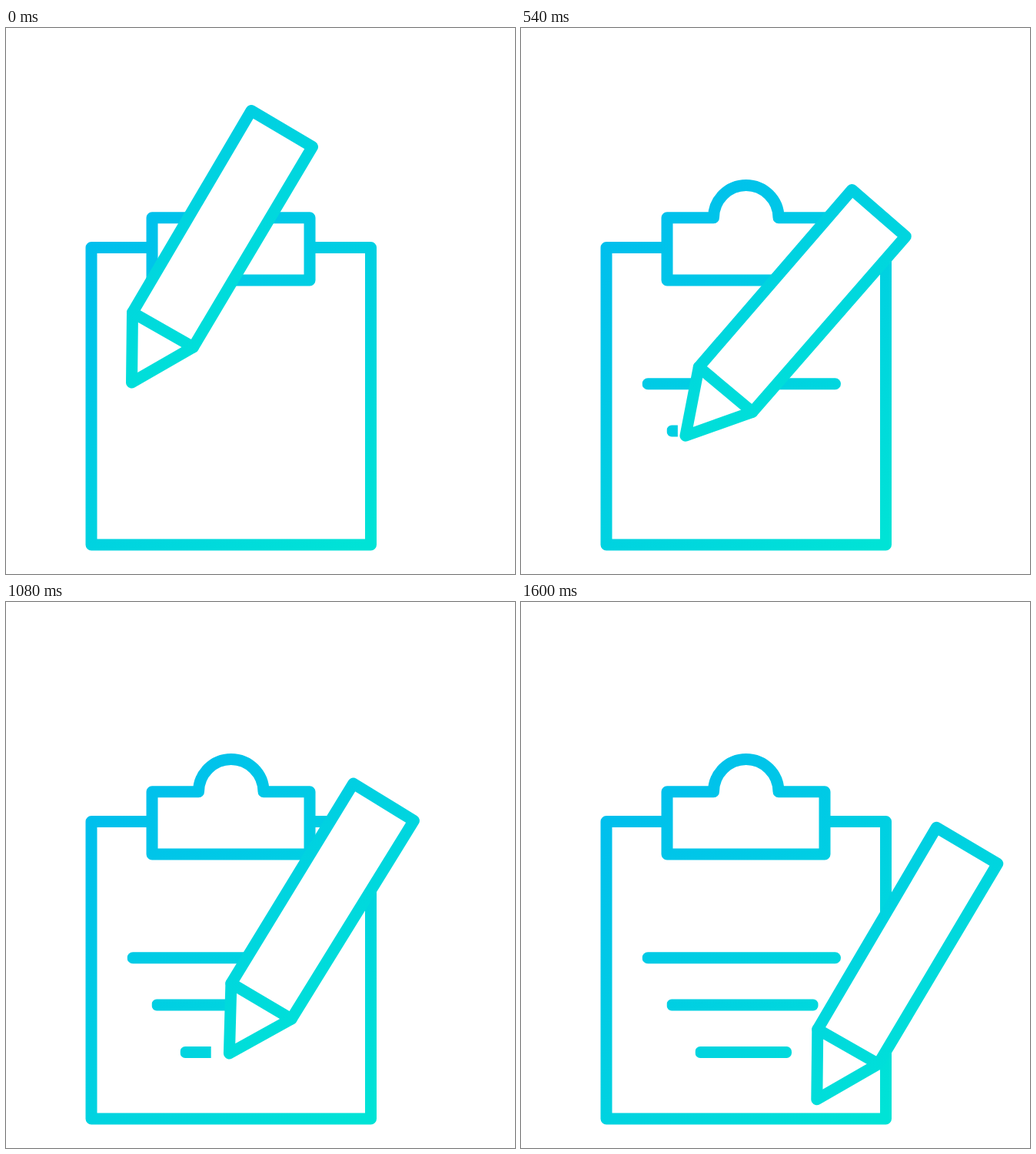
An HTML page that plays this animation: 662 by 710 pixels, repeating every 2 s.

```html
<!DOCTYPE html>
<html lang="en">
<head>
<meta charset="utf-8">
<title>Clipboard and pencil</title>
<style>
  html, body { margin: 0; width: 100%; height: 100%; overflow: hidden; background: #fff; }
  svg { display: block; width: 100vw; height: 100vh; }
  .stroke { fill: none; stroke-width: 15; stroke-linecap: round; stroke-linejoin: round; }
</style>
</head>
<body>
<svg viewBox="0 0 662 710">
  <defs>
    <linearGradient id="boardInk" gradientUnits="userSpaceOnUse" x1="130" y1="230" x2="500" y2="640">
      <stop offset="0" stop-color="#00bdee"/>
      <stop offset="1" stop-color="#00e3d6"/>
    </linearGradient>
    <linearGradient id="pencilInk" gradientUnits="userSpaceOnUse" x1="155" y1="99" x2="407" y2="469">
      <stop offset="0" stop-color="#00c8e6"/>
      <stop offset="1" stop-color="#00e8d4"/>
    </linearGradient>
    <clipPath id="wipe0"><rect x="150" y="450" width="0" height="26"/></clipPath>
    <clipPath id="wipe1"><rect x="150" y="511" width="0" height="26"/></clipPath>
    <clipPath id="wipe2"><rect x="150" y="572" width="0" height="27"/></clipPath>
  </defs>

  <g class="stroke" stroke="url(#boardInk)">
    <path stroke-linecap="butt" d="M190 285.5H111V672H474.5V285.5H395"/>
    <path d="M250.5 246.8H190V328H395V246.8H335a42.25 42.25 0 0 0-84.5 0Z"/>
  </g>

  <g fill="url(#boardInk)">
    <rect x="157.5" y="455.3" width="258.5" height="15" rx="7.5" clip-path="url(#wipe0)"/>
    <rect x="189.5" y="516.5" width="197" height="15" rx="6.5" clip-path="url(#wipe1)"/>
    <rect x="226.5" y="578" width="125.5" height="15" rx="6.5" clip-path="url(#wipe2)"/>
  </g>

  <g id="pencil" class="stroke" stroke="url(#pencilInk)">
    <path fill="#fff" d="M319 107.5L398.5 154.5L243.5 415L163.5 461L164.5 370Z"/>
    <path d="M164.5 370L243.5 415"/>
  </g>
</svg>

<script>
const LOOP = 2000, STEP = 20;
const TIP = '163.5 461';

// Pencil poses: time, dx, dy, degrees about the tip
const poses = [
  [0, 0, 0, 0],
  [280, 249.7, 0, 0],
  [520, 29.5, 70, 11.65],
  [700, 218.3, 63, 0],
  [920, 73.5, 128, 1.04],
  [1350, 217, 122.5, 0.78],
  [1600, 221.3, 185.7, 0]
];

// Line reveals: start, end, left, right
const wipes = [
  [0, 280, 157.5, 416],
  [524, 744, 189.5, 387],
  [1000, 1250, 226.5, 352]
];

const pencil = document.getElementById('pencil');
const masks = wipes.map((_, i) => document.querySelector(`#wipe${i} rect`));

const progress = (t, a, b) => Math.min(1, Math.max(0, (t - a) / (b - a)));
const mix = (a, b, k) => a + (b - a) * k;

function poseAt(t) {
  let i = 0;
  while (i < poses.length - 2 && t >= poses[i + 1][0]) i++;
  const from = poses[i], to = poses[i + 1];
  const k = progress(t, from[0], to[0]);
  return [1, 2, 3].map(n => mix(from[n], to[n], k));
}

function draw(t) {
  const [dx, dy, turn] = poseAt(t);
  pencil.setAttribute('transform', `translate(${dx} ${dy}) rotate(${turn} ${TIP})`);
  wipes.forEach(([start, end, left, right], i) => {
    const k = progress(t, start, end);
    masks[i].setAttribute('x', left);
    masks[i].setAttribute('width', (right - left) * k);
  });
}

const begin = performance.now();

function tick() {
  const t = (performance.now() - begin) % LOOP;
  draw(Math.floor(t / STEP) * STEP);
  requestAnimationFrame(tick);
}

draw(0);
requestAnimationFrame(tick);
</script>
</body>
</html>
```
